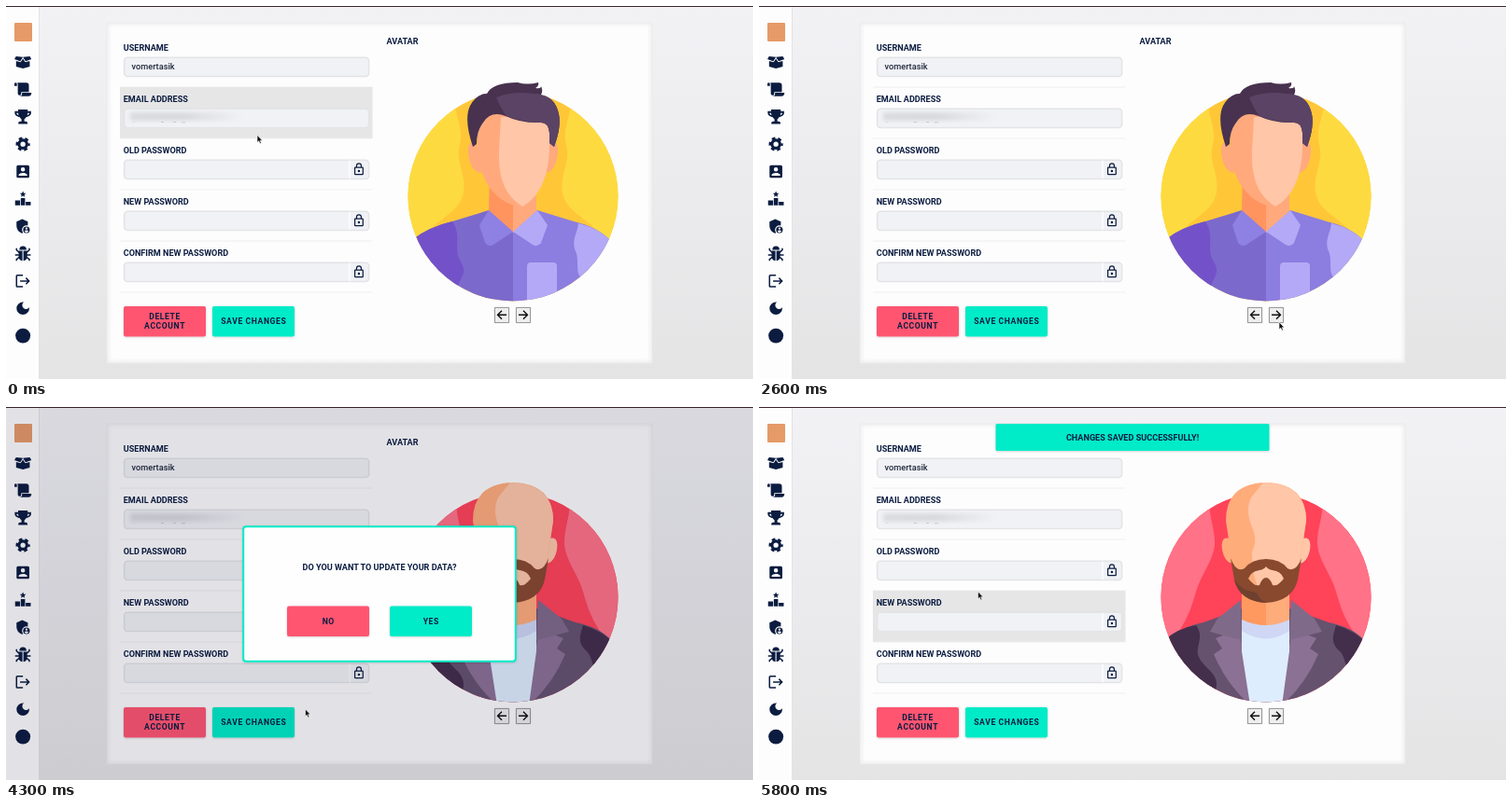
Animation of 800 by 400 pixels, one loop 5.9 s. Source, as an HTML page:

```html
<!DOCTYPE html>
<html lang="en">
<head>
<meta charset="utf-8">
<title>Account settings</title>
<style>
  html, body { margin: 0; width: 100%; height: 100%; overflow: hidden; background: #eee; }
  svg { display: block; width: 100%; height: 100%; }
  text { font: 700 9.1px Roboto, Arial, sans-serif; fill: #0b1c40; }
  .user { font-weight: 500; font-size: 9.2px; fill: #20293c; }
  .btn { font-size: 8.6px; letter-spacing: .6px; text-anchor: middle; }
  .mid { text-anchor: middle; }
  #icons { fill: #0b1c40; }
</style>
</head>
<body>
<svg viewBox="0 0 800 400" xmlns="http://www.w3.org/2000/svg">
  <defs>
    <linearGradient id="page" x1="0" y1="0" x2="0" y2="1">
      <stop offset="0" stop-color="#f2f2f5"/><stop offset="1" stop-color="#e4e4e5"/>
    </linearGradient>
    <linearGradient id="smear">
      <stop offset="0" stop-color="#d9dbde"/><stop offset=".45" stop-color="#d7d9dc"/>
      <stop offset="1" stop-color="#d7d9dc" stop-opacity="0"/>
    </linearGradient>
    <filter id="soft" x="-20%" y="-80%" width="140%" height="260%"><feGaussianBlur stdDeviation="2"/></filter>
    <filter id="drop" x="-10%" y="-20%" width="120%" height="150%">
      <feDropShadow dx="0" dy=".6" stdDeviation="1" flood-opacity=".2"/>
    </filter>
    <clipPath id="disc"><circle cx="543" cy="204" r="112.5"/></clipPath>
    <clipPath id="panelClip"><path d="M108 18H692V383H108Z"/></clipPath>
    <path id="wave" d="M425 90H487C476 108 489 126 488 148C486 166 474 178 468 198C462 219 458 230 440 255H425Z"/>
    <path id="wavy" d="M425 90H481C477 113 491 128 486 149C481 168 493 181 490 199C487 222 462 226 440 255H425Z"/>
    <path id="lock" d="M12 17a2 2 0 0 1-2-2c0-1.1.9-2 2-2a2 2 0 0 1 0 4m6 3V10H6v10h12m0-12a2 2 0 0 1 2 2v10a2 2 0 0 1-2 2H6a2 2 0 0 1-2-2V10c0-1.1.9-2 2-2h1V6a5 5 0 0 1 10 0v2h1m-6-5a3 3 0 0 0-3 3v2h6V6a3 3 0 0 0-3-3z"/>
  </defs>

  <path fill="url(#page)" d="M0 0H800V400H0Z"/>
  <path fill="#fdfdfd" d="M0 0H35V400H0Z"/>
  <path fill="#e3e3e5" d="M35 0H36V400H35Z"/>
  <path fill="#3f2529" d="M0 0H800V1H0Z"/>
  <rect x="9" y="18" width="19" height="20" rx="1" fill="#e59a68"/>
  <g id="icons"></g>

  <path fill="#fdfdfd" d="M108 18H692V383H108Z"/>
  <path d="M108 18H692V383H108Z" fill="none" stroke="#ececee" stroke-width="4" filter="url(#soft)" clip-path="url(#panelClip)"/>
  <path d="M108 18H692V383H108Z" fill="none" stroke="#e9e9ea" stroke-width=".8"/>
  <g id="rows"></g>
  <text x="407.5" y="41.3">AVATAR</text>

  <g id="first">
    <g clip-path="url(#disc)">
      <path fill="#ffc738" d="M430 90H656V320H430Z"/>
      <g fill="#fddb40"><use href="#wavy"/><use href="#wavy" transform="matrix(-1 0 0 1 1086 0)"/></g>
      <path fill="#7c69cc" d="M440 252Q452 237 478 231L517 219L543 242V320H440Z"/>
      <path fill="#8c7de0" d="M543 242L569 219L608 231Q634 237 648 252V320H543Z"/>
      <path fill="#7352c9" d="M436 250Q452 237 478 231C489 246 478 260 487 274C497 291 480 291 482 320H436Z"/>
      <path fill="#b3a9f6" d="M613 233Q637 239 650 254L629 294C604 296 616 275 610 263C605 251 612 244 613 233Z"/>
      <rect x="558" y="275" width="32" height="45" rx="4" fill="#b3a9f6"/>
    </g>
    <path fill="#ff945f" d="M518 180H543V243L517 220Z"/>
    <path fill="#ffa97d" d="M543 180H568V220L543 243Z"/>
    <path fill="#8f80e3" d="M517 219L543 242L522 256Q517 259 513 254L507 235Z"/>
    <path fill="#b3a9f6" d="M569 219L543 242L564 256Q569 259 573 254L580 235Z"/>
    <path fill="#ffa97d" d="M504 147Q494 143 495 157Q497 178 509 179ZM582 147Q592 143 591 157Q589 178 577 179Z"/>
    <path fill="#ffa97d" d="M505 112H582V153C581 184 571 204 553 215C531 215 506 192 505 153Z"/>
    <path fill="#ffc6a8" d="M530 119H582V153C581 184 571 205 553 215C534 203 527 184 528 155Z"/>
    <path fill="#48324f" d="M500 151Q490 121 497 107Q504 94 515 94Q521 82 548 82Q558 85 570 82Q571 86 567 88Q573 89 573 86Q576 92 572 96Q586 97 591 112Q596 127 587 151L582 147V136Q581 125 573 125Q552 126 535 118Q519 112 511 125Q504 134 504 148Z"/>
    <path fill="#5b4365" d="M525 98Q543 91 564 94Q586 94 591 112Q596 127 587 151L582 147V136Q581 125 573 125Q550 124 536 118Q530 110 525 98Z"/>
  </g>

  <g id="second" display="none">
    <g clip-path="url(#disc)">
      <path fill="#ff4359" d="M430 90H656V320H430Z"/>
      <g fill="#ff7287"><use href="#wave"/><use href="#wave" transform="matrix(-1 0 0 1 1086 0)"/></g>
      <path fill="#65526f" d="M437 251Q450 236 476 231L518 216H568L610 231Q636 236 649 251V320H437Z"/>
      <path fill="#432e4b" d="M434 250Q449 237 468 234C478 247 466 258 471 268C476 280 491 284 490 299Q488 306 490 320H434ZM618 234Q637 239 652 254V278L640 287C626 285 630 270 622 262C611 252 615 245 618 234Z"/>
      <path fill="#8b7194" d="M515 238L489 248L496 259L487 265Q500 296 524 318H528L518 262ZM571 238L597 248L590 259L599 265Q586 296 562 318H558L567 262Z"/>
      <path fill="#806a8a" d="M516 207L491 227L483 241L517 250ZM570 207L595 227L603 241L568 250Z"/>
      <path fill="#deedfd" d="M517 231H568V262L560 320H526L517 262Z"/>
    </g>
    <path fill="#ff995f" d="M517 183H543V238Q527 238 517 230Z"/>
    <path fill="#ffac7b" d="M543 183H568V230Q558 238 543 238Z"/>
    <path fill="#cfd7f5" d="M517 228Q543 240 568 228V240Q543 257 517 240Z"/>
    <path fill="#ffac7b" d="M504 141Q494 138 496 153Q499 168 509 168Z"/>
    <path fill="#ffc6a8" d="M582 141Q592 138 590 153Q587 168 577 168Z"/>
    <path fill="#ffac7b" d="M500 122Q500 82 543 81Q586 82 586 122L578 175Q573 207 543 210Q512 207 508 175Z"/>
    <path fill="#ffc6a8" d="M540 81Q586 82 586 122L578 175Q571 203 543 204Q528 193 528 155Q534 145 529 131Q520 112 527 97Z"/>
    <path fill="#88492f" fill-rule="evenodd" d="M505 162Q511 178 520 173Q528 163 543 163Q558 163 566 173Q575 178 581 162L577 185Q572 208 543 210Q514 208 509 185ZM524 184Q527 176 536 175Q541 174 543 171Q545 174 550 175Q559 176 562 184Q555 193 550 191Q547 183 543 183Q539 183 536 191Q531 193 524 184Z"/>
    <path fill="#70402f" d="M509 185Q516 197 533 199Q537 207 543 210Q514 208 509 185Z"/>
  </g>

  <g id="arrows" fill="#eee" stroke="#777" stroke-width=".8">
    <path d="M523.4 323.4H538.6V339.6H523.4ZM546.4 323.4H561.6V339.6H546.4Z"/>
    <path fill="none" stroke="#111" stroke-width="1.4" d="M536 331.3H526.7M531 326.8L526.5 331.3L531 335.8M549 331.3H558.3M554 326.8L558.5 331.3L554 335.8"/>
  </g>

  <rect x="126" y="322" width="88" height="32.5" rx="2" fill="#ff5470" filter="url(#drop)"/>
  <text class="btn" x="170.1" y="336">DELETE</text>
  <text class="btn" x="170.1" y="345.6">ACCOUNT</text>
  <g id="save">
    <rect x="221" y="322" width="88" height="32.5" rx="2" fill="#00ebc7" filter="url(#drop)"/>
    <text class="btn" x="265.3" y="341">SAVE CHANGES</text>
  </g>

  <g id="dialog">
    <path fill="#0a1030" fill-opacity=".11" d="M0 0H800V400H0Z"/>
    <rect x="254.2" y="128.2" width="291.6" height="144.6" rx="3" fill="#fefefe" stroke="#00ebc7" stroke-width="2" filter="url(#drop)"/>
    <text class="mid" x="400" y="174.5">DO YOU WANT TO UPDATE YOUR DATA?</text>
    <rect x="301" y="213.5" width="88" height="32.5" rx="2" fill="#ff5470" filter="url(#drop)"/>
    <text class="btn" x="345.3" y="232.6">NO</text>
    <g id="yes">
      <rect x="411" y="213.5" width="88" height="32.5" rx="2" fill="#00ebc7" filter="url(#drop)"/>
      <text class="btn" x="455.3" y="232.6">YES</text>
    </g>
  </g>

  <g id="toast">
    <rect x="253.5" y="18" width="293" height="29" rx="1.5" fill="#00ebc7" filter="url(#drop)"/>
    <text class="mid" x="400" y="35.8">CHANGES SAVED SUCCESSFULLY!</text>
  </g>

  <g id="pointer" stroke="#fff" stroke-width=".6" fill="#111">
    <path id="tip" d="M0 0V7.8L1.8 6.2L3 9L4.4 8.4L3.2 5.7H5.6Z"/>
    <path id="hand" d="M-.8 0Q.4-.8 1 .4V3L4.2 3.8Q5 4.2 4.7 6L4 8.5H0L-2.4 5.2Q-2.2 4.2-.8 5.2Z"/>
  </g>
</svg>

<script>
const LOOP = 5900, STEP = 100;
const $ = id => document.getElementById(id);

// Sidebar icons on a 24-unit grid, spaced evenly.
const icons = [
  '<path d="M2.3 3.8L0 8L8.2 10.7L12 4.8ZM21.7 3.8L24 8L15.8 10.7L12 4.8ZM12 7.1L9.2 11.5Q8.500 12.300 7.500 12L2.400 10.500V18.500L12 21L21.600 18.500V10.500L16.500 12Q15.500 12.300 14.800 11.500Z"/>',
  '<path d="M1.8 2.400A1.800 1.800 0 0 0 0 4.200V7.200H3.600V4.200A1.800 1.800 0 0 0 1.800 2.400ZM9.600 17.900V15.600H20.400V6A3.600 3.600 0 0 0 16.800 2.400H4.200Q4.800 3.200 4.800 4.200V18A2.400 2.400 0 0 0 9.600 17.900ZM10.800 16.800V18A3.600 3.600 0 0 1 7.200 21.600H19.800A4.200 4.200 0 0 0 24 16.800Z"/>',
  '<path fill-rule="evenodd" d="M23.500 4H18.700V1.700H5.300V4H.5V7C.5 10 4.500 12 7.200 12.300C8.500 14.500 10 15.500 10 15.500V18.500H8A2.500 2.500 0 0 0 5.500 21V22H18.500V21A2.500 2.500 0 0 0 16 18.500H14V15.500S15.500 14.500 16.800 12.300C19.500 12 23.500 10 23.500 7ZM3 6.500H5.300Q5.400 8.500 6 10Q3 9 3 7ZM21 6.500V7Q21 9 18 10Q18.600 8.500 18.700 6.500Z"/>',
  '<g fill="none" stroke="#0b1c40"><circle cx="12" cy="12" r="5.6" stroke-width="4.2"/><circle cx="12" cy="12" r="8.400" stroke-width="3.200" stroke-dasharray="4.800 4" stroke-dashoffset="2.400"/></g>',
  '<path fill-rule="evenodd" d="M5 3H19a2 2 0 0 1 2 2V19a2 2 0 0 1-2 2H5a2 2 0 0 1-2-2V5a2 2 0 0 1 2-2ZM12 6a3 3 0 0 0 0 6a3 3 0 0 0 0-6ZM6 18H18V17C18 15 14 13.900 12 13.900S6 15 6 17Z"/>',
  '<path d="M1 14H8V21H1ZM9 11H15V21H9ZM16 16H23V21H16ZM12 1l1.300 2.800 3 .3-2.300 2 .7 3L12 7.500L9.300 9.100l.7-3-2.300-2 3-.3Z"/>',
  '<path d="M11 2L3 5.500V11C3 16 6 20.500 11 22Q20 18 19 5.500Z"/><circle cx="17" cy="17" r="5.500" stroke="#fdfdfd" stroke-width="1.600"/><path fill="#fdfdfd" d="M17 13.700a1.500 1.500 0 0 1 0 3a1.500 1.500 0 0 1 0-3ZM14 19.200Q17 16.200 20 19.200L17 21Z"/>',
  '<path d="M7 6.500a5 5 0 0 1 10 0ZM6 8H11.300V22Q6 21.500 6 16ZM12.700 8H18V16Q18 21.500 12.700 22Z"/><path fill="none" stroke="#0b1c40" stroke-width="2" d="M7 10.500L3 7V4.500M17 10.500L21 7V4.500M7 14H1M17 14H23M7 17L3 20V22M17 17L21 20V22"/>',
  '<path d="M17 7l-1.400 1.400L18.200 11H8v2h10.200l-2.600 2.600L17 17l5-5ZM4 5h8V3H4a2 2 0 0 0-2 2v14a2 2 0 0 0 2 2h8v-2H4Z"/>',
  '<path d="M12 3a9 9 0 1 0 9 9c0-.5 0-.9-.1-1.400a5.400 5.400 0 1 1-7.500-7.500C12.900 3 12.500 3 12 3Z"/>',
  '<circle cx="12" cy="12" r="10.500"/>'
];
$('icons').innerHTML = icons.map((icon, i) =>
  `<g transform="translate(9 ${51 + i * 29.35}) scale(.76)">${icon}</g>`).join('');

// Form rows
const labels = ['USERNAME', 'EMAIL ADDRESS', 'OLD PASSWORD', 'NEW PASSWORD', 'CONFIRM NEW PASSWORD'];
const rowTop = i => 32 + i * 55;
const extras = i => {
  if (i === 0) return '<text class="user" x="134.5" y="36.3">vomertasik</text>';
  if (i === 1) return `<rect x="133" y="27" width="122" height="9" fill="url(#smear)" filter="url(#soft)"/>
    <path stroke="#b9bbc0" stroke-width=".7" d="M136.5 37.5h1M166 37.5h3M179 37.5h3M188 37.8h4"/>`;
  return `<path fill="#fff" d="M367.5 23.5H368.7V43.3H367.5Z"/>
    <use href="#lock" fill="#0b1c40" transform="translate(370.5 25.6) scale(.62)"/>`;
};
$('rows').innerHTML = labels.map((label, i) => `<g transform="translate(0 ${rowTop(i)})">
  <path class="shade" fill="#e6e6e6" d="M122 0H392.5V55H122Z"/>
  <path fill="#efeff0" d="M122 54.5H392.5V55.5H122Z"/>
  <text x="125.7" y="16.3">${label}</text>
  <rect x="126.6" y="23.3" width="262" height="20.2" rx="3.5" fill="#f1f2f5" stroke="#e3e4e6" stroke-width="1.6"/>
  ${extras(i)}</g>`).join('');
const shades = [...document.querySelectorAll('.shade')];

// Pointer path: time, x, y
const track = [
  [0, 269, 138.5], [300, 264, 168], [800, 243, 268], [1200, 237, 311],
  [1600, 290, 315], [2200, 500, 334], [2600, 557, 339], [2800, 555, 334],
  [3000, 555, 334], [3400, 430, 360], [3700, 315, 348], [3900, 299, 345],
  [4100, 299, 345], [4300, 320.5, 324], [4700, 446, 240], [5000, 450, 240],
  [5400, 318, 210], [5800, 234.5, 198], [LOOP, 234.5, 198]
];

function pointerAt(t) {
  const i = track.findIndex((k, n) => n && t <= k[0]);
  const [a, b] = [track[i - 1], track[i]];
  const p = (t - a[0]) / (b[0] - a[0]);
  return [a[1] + (b[1] - a[1]) * p, a[2] + (b[2] - a[2]) * p];
}

const clamp = v => Math.max(0, Math.min(1, v));
const show = (id, on) => $(id).setAttribute('display', on ? 'inline' : 'none');
const inside = (x, y, left, top, w, h) => x >= left && x < left + w && y >= top && y < top + h;
const grow = (id, on, x, y) => $(id).setAttribute('transform',
  on ? `translate(${x} ${y}) scale(1.028) translate(${-x} ${-y})` : '');

function draw(t) {
  const [x, y] = pointerAt(t);
  const asking = t >= 4200 && t < 5000;
  const onSave = !asking && inside(x, y, 221, 322, 88, 33);
  const onYes = asking && inside(x, y, 411, 213, 88, 33);

  shades.forEach((s, i) => s.setAttribute('display',
    !asking && inside(x, y, 122, rowTop(i), 270, 55) ? 'inline' : 'none'));
  show('first', t < 2800);
  show('second', t >= 2800);
  grow('save', onSave, 265, 338);
  grow('yes', onYes, 455, 229.7);

  show('dialog', asking);
  $('dialog').setAttribute('opacity', clamp((t - 4100) / 200));

  const slide = 1 - (1 - clamp((t - 5000) / 400)) ** 2;
  show('toast', t > 5000);
  $('toast').setAttribute('transform', `translate(0 ${-50 * (1 - slide)})`);

  $('pointer').setAttribute('transform', `translate(${x} ${y})`);
  show('tip', !onSave && !onYes);
  show('hand', onSave || onYes);
}

function tick() {
  const t = performance.now() % LOOP;
  draw(Math.floor(t / STEP) * STEP);
  requestAnimationFrame(tick);
}
tick();
</script>
</body>
</html>
```
